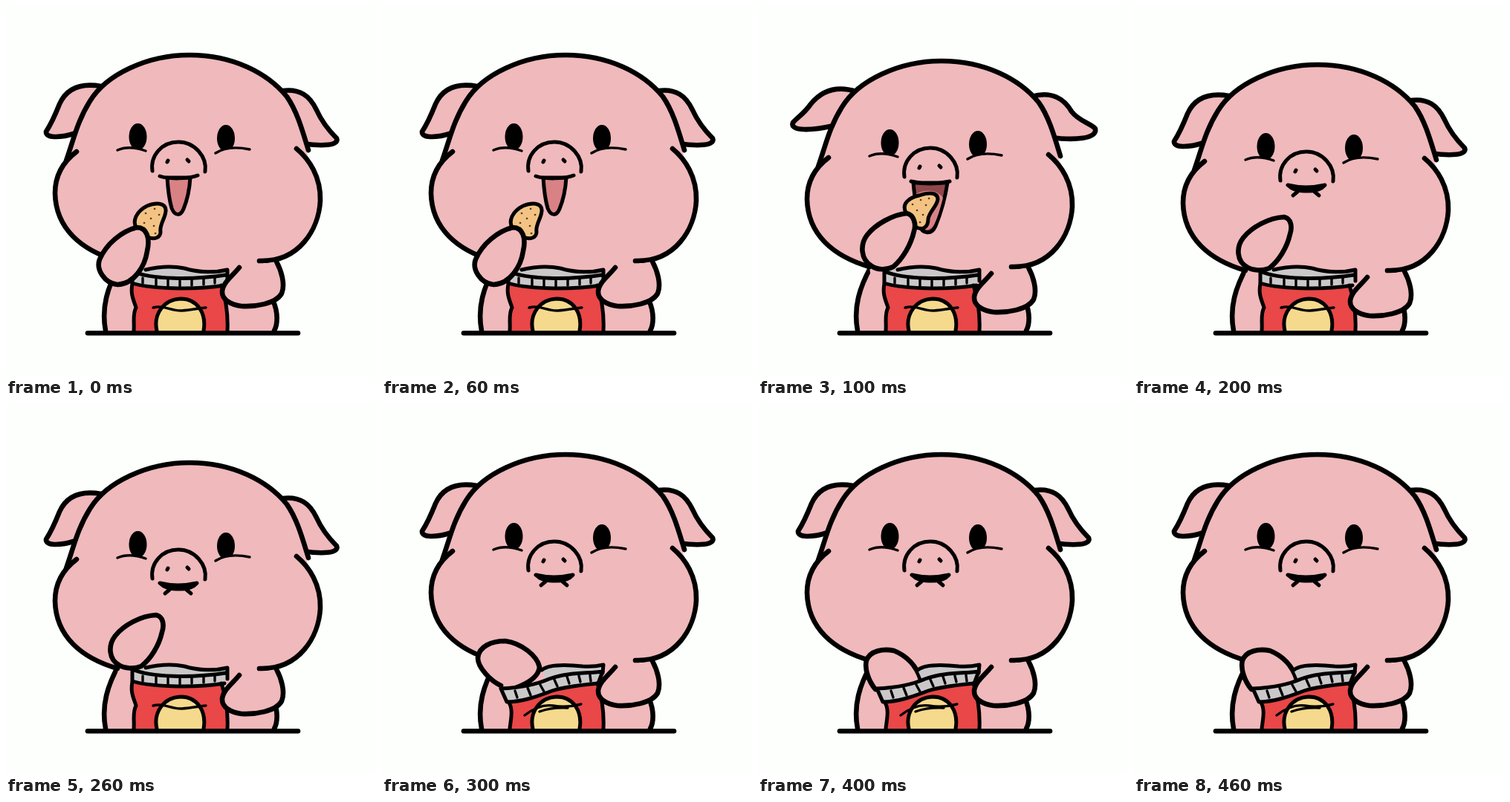
An HTML page for the animation above (0.5 s loop, 498 px wide and 498 px high).

```html
<!DOCTYPE html>
<html lang="en">
<head>
<meta charset="utf-8">
<title>Snacking pig</title>
<style>
  html, body { margin: 0; width: 100%; height: 100%; overflow: hidden; background: #fdfffc; }
  svg { display: block; width: 100vw; height: 100vh; }
  .ink { fill: none; stroke: #000; stroke-width: 6.6; stroke-linecap: round; stroke-linejoin: round; }
  .pink { fill: #f0b9bc; }
  .mid { stroke-width: 5; }
  .thin { stroke-width: 3.4; }
  .gray { fill: #cbc8ca; }
  .red { fill: #e94748; }
  .rose { fill: #d98286; }
  .dark { fill: #8f474b; }
  .black { fill: #000; }
  .chip { fill: #f3c384; stroke-width: 5; }
  .dots { stroke: #5b3a20; stroke-width: 2.6; }
</style>
</head>
<body>
<svg viewBox="0 0 498 498">
  <g class="bob">
    <g class="ink pink" data-on="10111">
      <path d="M128 108C99 103 81 112 72 132C66 147 60 160 54 169C53 178 72 178 94 171"/>
      <path d="M372 114C396 111 409 121 418 140C426 158 436 169 445 178C449 188 425 189 400 185"/>
    </g>
    <g class="ink pink" data-on="01000">
      <path d="M132 107C103 98 84 108 71 124C62 137 53 142 47 149C43 158 62 162 102 153"/>
      <path d="M368 114C395 106 412 117 422 134C432 147 446 149 454 157C457 171 426 173 394 169"/>
    </g>
  </g>

  <path class="pink" d="M152 340C137 375 128 405 134 438H361C365 428 366 412 358 396L345 340Z"/>
  <path class="ink" d="M152 351C137 378 128 405 134 437M360 398C366 412 366 428 361 437"/>

  <g class="bob">
    <path class="pink" d="M83 205C91 180 96 155 113 128C135 92 190 66 247 66C305 66 352 90 378 122C392 142 398 168 406 202C416 219 424 238 423 262C421 300 395 345 341 343V358H152L150 343C102 329 67 300 66 252C66 232 72 217 83 205Z"/>
    <g class="ink">
      <path d="M81 208C91 180 96 155 113 128C135 92 190 66 247 66C305 66 352 90 378 122C392 142 399 168 407 194"/>
      <path d="M95 196C75 211 66 229 66 252C67 300 102 329 150 343"/>
      <path d="M391 192C408 206 424 230 423 262C421 300 395 345 341 343"/>
    </g>
    <ellipse cx="177.5" cy="176" rx="12" ry="18"/>
    <ellipse cx="296" cy="178" rx="12" ry="18"/>
    <path class="pink" d="M150 194Q166 187 189 196V202H150ZM282 198Q299 187 328 193V201H282Z"/>
    <path class="ink thin" d="M150 194Q166 187 188 195M282 198Q299 187 328 193"/>
    <path class="ink mid" d="M197 222C194 201 210 183 232 183C254 183 271 203 268 223"/>
    <path class="ink mid" d="M218 208L217 210M244 207L246 209"/>

    <g class="ink mid" data-on="10000">
      <path class="rose" d="M217 231C218 247 220 262 223 272C227 283 235 283 239 273C244 261 247 247 248 231Z"/>
      <path d="M207 229C218 233 245 233 258 228"/>
    </g>
    <g data-on="01000">
      <path class="ink mid dark" d="M209 230C211 250 213 270 217 286C221 300 234 300 239 288C246 271 252 250 255 230Z"/>
      <path class="rose" d="M213 245C226 238 242 240 249 250C245 266 240 282 236 288C229 297 220 293 218 284Z"/>
      <path class="ink mid" d="M206 228Q231 234 258 228"/>
    </g>
    <g class="ink mid" data-on="00111">
      <path class="black" d="M207 228Q231 234 257 228Q249 237 232 236Q216 237 207 228Z"/>
      <path d="M220 237L214 242M243 237L249 242"/>
    </g>
  </g>

  <g data-on="11100">
    <path class="red" d="M170 374C167 390 173 398 175 406C170 415 173 426 172 438H298C299 416 297 398 290 376Z"/>
    <path class="gray" d="M170 357C188 353 215 349 240 353C260 359 282 359 298 355L294 376C250 382 195 380 170 373Z"/>
    <path class="ink mid" d="M188 355C205 351 225 350 240 353C260 359 282 359 298 355L298 370"/>
    <path class="ink mid" d="M170 357C195 368 250 369 296 362M170 357L170 373C190 380 250 383 294 376"/>
    <path class="ink thin" d="M184 366V373M202 368V376M218 369V377M234 370V377M250 368V376M266 367V375M281 366V373"/>
  </g>

  <path class="ink pink" data-on="00010" d="M160 379C145 372 129 354 129 342C130 326 148 319 166 319C188 322 209 339 212 354C211 366 199 375 180 382"/>
  <path class="ink pink" data-on="00001" d="M158 384C149 373 143 357 146 345C151 332 168 329 183 332C200 339 213 352 219 371"/>

  <g data-on="00011">
    <path class="gray" d="M215 358C226 349 252 351 270 353Q285 354 298 351L295 364L222 374Z"/>
    <path class="ink mid" d="M215 358C226 349 252 351 270 353Q285 354 298 351L297 362"/>
    <path class="red" d="M171 402C177 412 173 426 172 438H298C299 416 297 398 290 374C250 376 212 386 171 402Z"/>
    <path class="gray ink mid" d="M160 383C183 382 207 378 225 370C250 361 275 363 297 360L291 376C270 378 247 380 229 386C208 394 188 401 168 401Z"/>
    <path class="ink thin" d="M179 386L182 395M196 382L200 392M213 378L218 387M232 371L236 380M249 367L252 376M265 366L267 374M280 365L281 373"/>
  </g>

  <path class="ink mid" style="fill:#f5d98d" d="M203 437C198 415 212 395 235 394C258 394 270 414 266 437"/>
  <path class="ink mid" d="M298 437C299 416 297 398 290 376"/>
  <g class="ink" data-on="11100">
    <path class="mid" d="M170 374C167 390 173 398 175 406C170 415 173 426 172 437"/>
    <path class="thin" d="M198 406C213 402 222 411 237 410C250 409 258 407 269 406"/>
  </g>
  <g class="ink" data-on="00011">
    <path class="mid" d="M171 402C177 412 173 426 172 437"/>
    <path class="thin" d="M192 419C205 409 217 404 230 406C246 409 257 407 268 404M212 414Q228 408 250 409"/>
  </g>

  <g data-on="10000">
    <path class="ink chip" d="M176 300C169 289 176 276 190 269C202 264 214 265 215 274C216 284 206 294 208 304C208 312 199 315 191 311Z"/>
    <path class="ink dots" d="M188 279h.1M200 273h.1M206 281h.1M195 286h.1M186 292h.1M199 296h.1M201 306h.1"/>
    <path class="ink pink" d="M150 375C132 373 121 354 126 341C135 320 156 303 176 298C190 298 194 313 190 330C187 350 173 374 150 375Z"/>
  </g>
  <g data-on="01000">
    <path class="ink chip" d="M199 278C193 266 203 258 217 255C228 251 242 250 242 260C241 270 230 277 229 287C229 298 221 303 212 297Z"/>
    <path class="ink dots" d="M208 267h.1M219 261h.1M230 259h.1M226 268h.1M214 275h.1M222 281h.1M218 291h.1"/>
    <path class="ink pink" d="M153 350C138 341 137 321 147 308C158 294 181 281 200 279C210 281 213 294 210 303C206 321 195 340 182 351C172 356 160 355 153 350Z"/>
  </g>
  <path class="ink pink" data-on="00100" d="M153 352C138 344 137 325 147 312C158 298 181 285 202 284C212 286 213 298 210 307C206 325 195 343 182 353C172 357 160 356 153 352Z"/>

  <path class="ink pink bob" d="M364 344C371 357 376 375 371 387C363 401 335 405 317 404C302 402 291 395 291 385C291 373 304 364 314 352"/>
  <path class="ink" d="M110 440.300H393"/>
</svg>
<script>
  const LOOP = 500;
  const BOB = [0, 8, 13, 2, 2];

  // Hold each value for an equal share of the loop.
  function hold(el, prop, values) {
    const n = values.length;
    const steps = values.map((v, i) => ({ [prop]: v, offset: i / n, easing: 'step-end' }));
    steps.push({ [prop]: values[n - 1], offset: 1 });
    el.animate(steps, { duration: LOOP, iterations: Infinity }).startTime = 0;
  }

  document.querySelectorAll('.bob').forEach(el =>
    hold(el, 'transform', BOB.map(y => `translateY(${y}px)`)));

  document.querySelectorAll('[data-on]').forEach(el =>
    hold(el, 'opacity', [...el.dataset.on].map(Number)));
</script>
</body>
</html>
```
